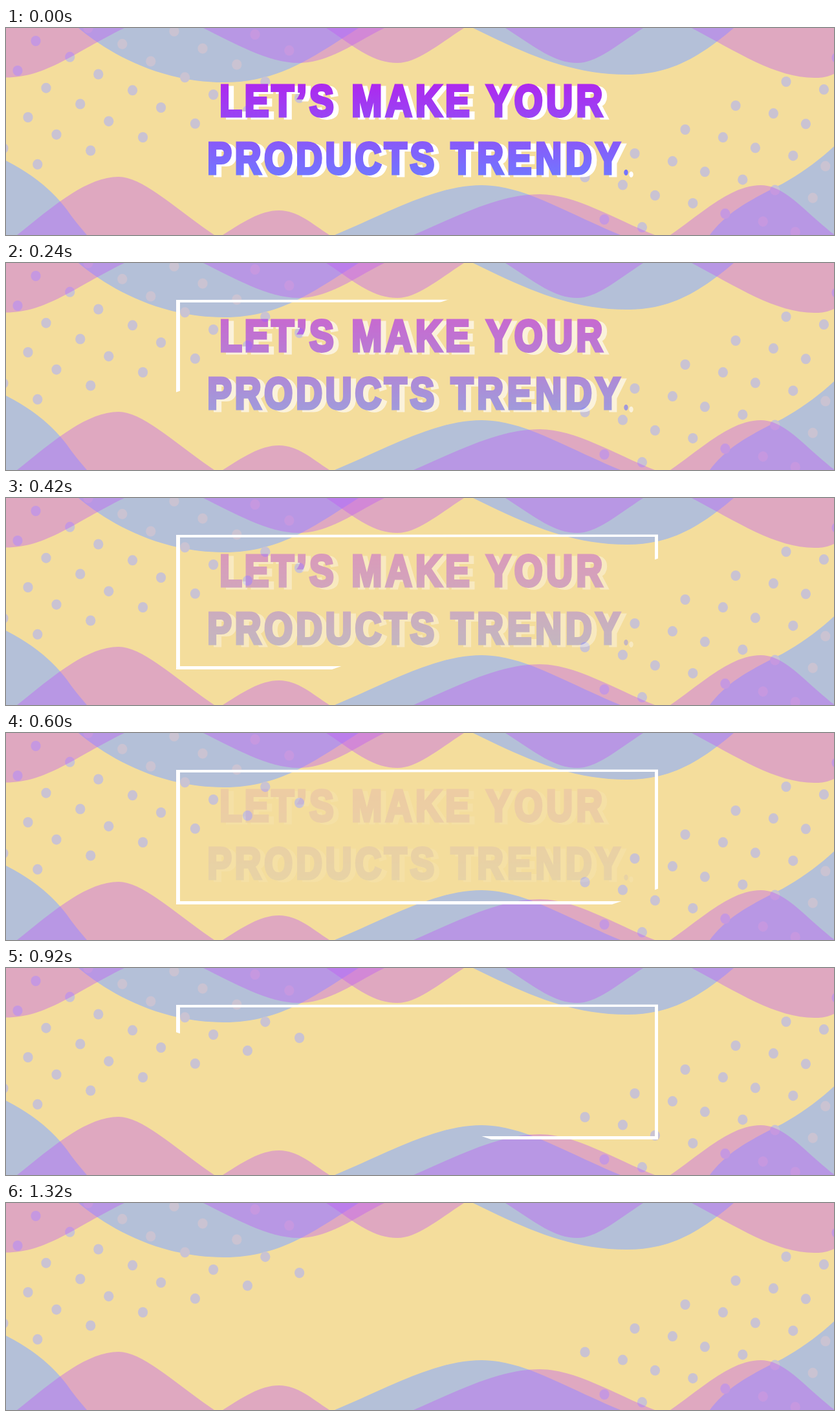
Recreate the animation shown at these times as an HTML page. Size 1280 by 320 pixels, loop 1.42 s.

```html
<!DOCTYPE html>
<html lang="en">
<head>
<meta charset="utf-8">
<title>Trendy banner</title>
<style>
  html, body { margin: 0; width: 100%; height: 100%; overflow: hidden; background: #f4dd9c; }
  svg { display: block; width: 1280px; height: 320px; }
  text { font: bold 68px "Liberation Sans", Arial, sans-serif; font-kerning: none; }
</style>
</head>
<body>
<svg viewBox="0 0 1280 320">
  <defs>
    <linearGradient id="ink" gradientUnits="userSpaceOnUse" x1="0" y1="86" x2="0" y2="228">
      <stop offset="0" stop-color="#ae28ee"/>
      <stop offset="1" stop-color="#7276ff"/>
    </linearGradient>
    <clipPath id="wipe"><polygon id="band"/></clipPath>
    <g id="words" transform="scale(.83 1)" stroke-width="4.8">
      <ellipse cx="1154.8" cy="223.3" rx="1.5" ry="2.2"/>
    </g>
  </defs>

  <rect width="1280" height="320" fill="#f4dd9c"/>
  <g fill="#b4c0d8">
    <path d="M112 0C150 32 230 84 337 84C420 84 470 48 545 0"/>
    <path d="M722 0C800 38 870 72 960 72C1025 72 1070 47 1125 0"/>
    <path d="M0 205C45 228 75 255 95 282C103 294 113 306 125 320H0"/>
    <path d="M508 320C590 286 664 243 735 243C800 243 858 282 950 320"/>
    <path d="M1088 320C1115 284 1150 266 1200 241C1230 224 1255 206 1280 183V320"/>
  </g>
  <g id="dots" fill="#cac3d2"></g>
  <g fill="#bd59f6" fill-opacity=".4">
    <path d="M0 76.5C62 76.5 105 38 183 0H0"/>
    <path d="M305 0C350 22 405 54 452 54C500 54 540 22 585 0"/>
    <path d="M495 0C535 26 565 54 605 54C635 54 665 28 708 0"/>
    <path d="M772 0C820 31 848 54 883 54C912 54 940 30 985 0"/>
    <path d="M1060 0C1130 37 1190 77 1250 77C1262 77 1272 75 1280 71V0"/>
    <path d="M17 320C60 287 120 230 174 230C212 230 262 280 322 320"/>
    <path d="M335 320C365 301 393 282 422 282S472 302 500 320"/>
    <path d="M630 320C700 290 762 257 825 257C880 257 940 295 1003 320"/>
    <path d="M1027 320C1075 287 1120 243 1167 243C1205 243 1235 285 1280 319V320"/>
  </g>

  <g id="title">
    <use href="#words" transform="translate(8 3)" fill="#fff" stroke="#fff"/>
    <use href="#words" fill="url(#ink)" stroke="url(#ink)"/>
  </g>
  <g clip-path="url(#wipe)">
    <path fill="#fff" fill-rule="evenodd"
      d="M263 57L1008 56.4V265H263ZM269 61L1003 60V260H269Z"/>
  </g>
</svg>

<script>
const LOOP = 1420, SLOPE = 2.94, SQUEEZE = 0.83;
const $ = id => document.getElementById(id);

function add(parent, tag, attrs, content = '') {
  const el = document.createElementNS('http://www.w3.org/2000/svg', tag);
  for (const key in attrs) el.setAttribute(key, attrs[key]);
  el.textContent = content;
  parent.append(el);
}

// A diagonal chain of dots whose steps alternate between two vectors
function chain(x, y, count, steps, first = 0) {
  for (let i = 0; i < count; i++) {
    add($('dots'), 'ellipse', { cx: x, cy: y, rx: 7.6, ry: 8 });
    const [dx, dy] = steps[(i + first) % 2];
    x += dx;
    y += dy;
  }
}

const steep = [[52.8, 24.8], [44, 26.7]], flat = [[58.4, 12.1], [50, 16.2]];
[[46, 20, 6, 0], [127, 0, 6, 0], [260, 5, 5, 1], [385, 10, 2, 0],
 [18, 66, 5, 1], [34, 138, 3, 1], [-4, 186, 2, 0]]
  .forEach(([x, y, n, first]) => chain(x, y, n, steep, first));
[[1284, 46, 1], [1206, 83, 2], [1128, 120, 3], [1050, 157, 5],
 [972, 194, 6], [895, 230.5, 7], [925, 296, 2]]
  .forEach(([x, y, n]) => chain(x, y, n, flat));

[['LET’S', 330.2, 135.6, 5], ['MAKE', 534.2, 135.6, 6.6], ['YOUR', 742.5, 135.6, 6.7],
 ['PRODUCTS', 311.2, 225, 5.9], ['TRENDY', 687.8, 225, 7.1]]
  .forEach(([word, x, y, spacing]) =>
    add($('words'), 'text', { x: x / SQUEEZE, y, 'letter-spacing': spacing }, word));

// 30 ms steps with one held beat, then 100 ms steps
function snap(t) {
  if (t >= 720) return 720 + Math.floor((t - 720) / 100) * 100;
  const step = Math.floor(t / 30) * 30;
  return step === 570 ? 540 : step;
}

function draw(t) {
  $('title').setAttribute('opacity', Math.max(0, 1 - t / 660));
  // The border is revealed from the top left, then erased from the bottom left
  const reveal = 850 + 2.405 * (t - 240), erase = -29 + 2.2 * (t - 920);
  const lean = SLOPE * 320;
  $('band').setAttribute('points',
    `${erase},0 ${reveal},0 ${reveal - lean},320 ${erase + lean},320`);
}

const start = performance.now();
function tick() {
  draw(snap((performance.now() - start) % LOOP));
  requestAnimationFrame(tick);
}
tick();
</script>
</body>
</html>
```
